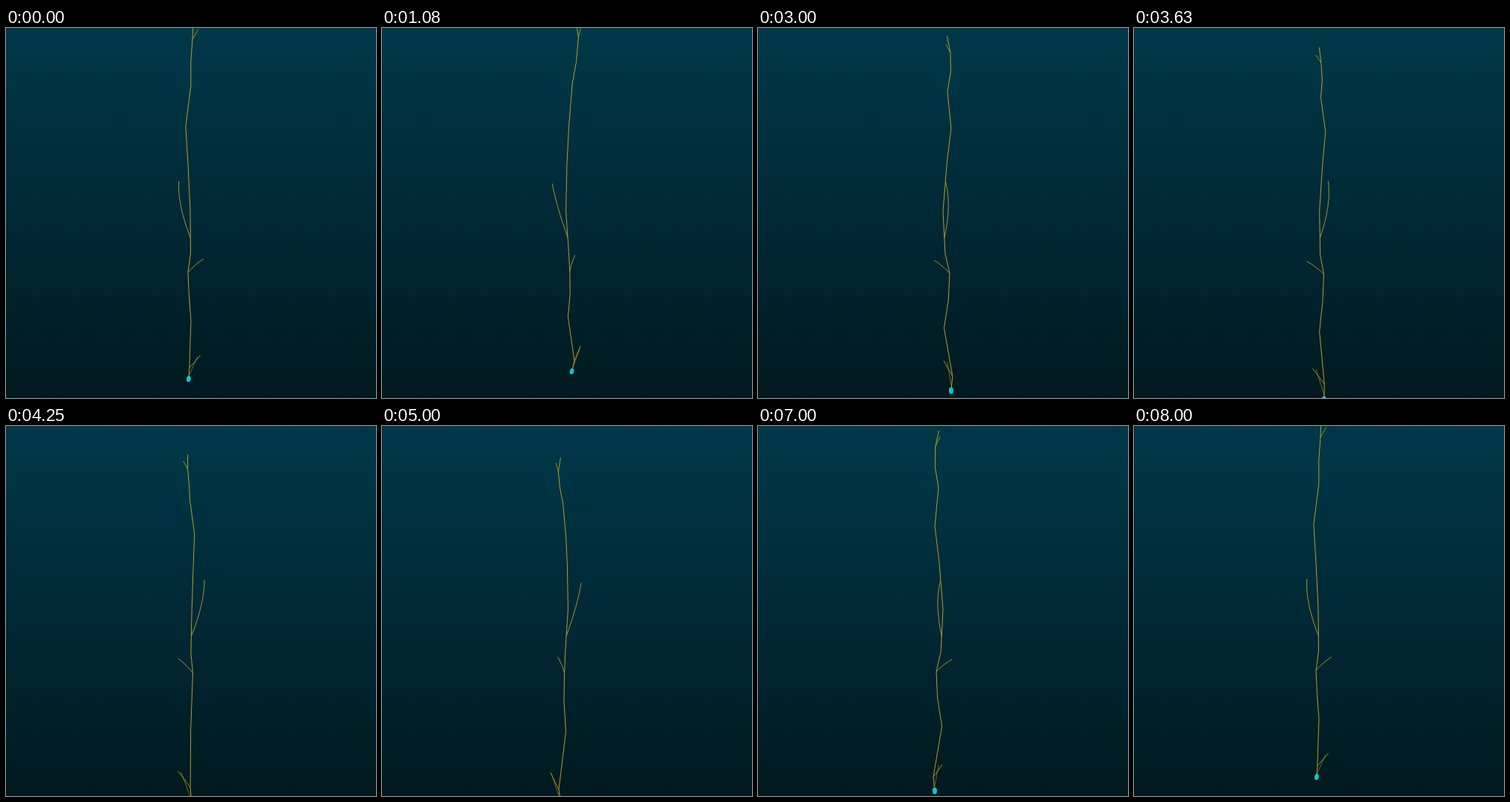
Animation of 500 by 500 pixels, one loop 8.04 s. Source, as an HTML page with a canvas:

```html
<!DOCTYPE html>
<html lang="en">
<head>
<meta charset="utf-8">
<title>Rotating neuron</title>
<style>
html, body { margin: 0; width: 100%; height: 100%; overflow: hidden; background: #002936; }
canvas { display: block; width: 500px; height: 500px; }
</style>
</head>
<body>
<canvas id="stage" width="500" height="500"></canvas>
<script>
const ctx = document.getElementById('stage').getContext('2d');
const SIZE = 500, MID = SIZE / 2;
const LOOP = 8040, STEPS = 192, FPS = 24;
const DIST = 520;           // camera distance
const TILT = 0.25;          // sine of the angle between cell and orbit axis
const TILT_COS = Math.sqrt(1 - TILT * TILT);
const PHASE = Math.PI / 4;  // angle at which the camera is highest
const DEPTH = 0.5;          // thickness of the cell relative to its width

// Bends of the trunk from the soma upward: [x, z, height].
const bends = [
  [-3.2, 12.4, -241], [-2.1, 16.3, -222], [0, 2, -155], [-2.5, 8, -117],
  [-4, 8.7, -81], [-0.5, 3.7, -55], [-1, -1, 3], [-4, 3.4, 68],
  [-6.7, 8.9, 115], [0, 8.5, 166], [0, 15, 193], [2, 16.4, 220], [3, 10.8, 242]
];
const SOMA = bends[0];

const mix = (p, q, t) => p.map((v, i) => v + (q[i] - v) * t);

// Point on the trunk at a given height.
function trunkAt(h) {
  const i = bends.findIndex(p => p[2] > h);
  const lo = bends[i - 1], hi = bends[i];
  return mix(lo, hi, (h - lo[2]) / (hi[2] - lo[2]));
}

// Quadratic curve from the trunk to a tip; straight without a control point.
function sprout(h, tip, bend) {
  const base = trunkAt(h);
  const control = bend || mix(base, tip, 0.5);
  const points = [];
  for (let t = 0; t <= 1; t += 0.125) {
    points.push(mix(mix(base, control, t), mix(control, tip, t), t));
  }
  return points;
}

const branches = [
  sprout(220, [9, 14.5, 232]),
  sprout(-33.5, [-16.5, -11.5, 42], [-18.5, -2, 12]),
  sprout(-81, [17.2, 0, -64], [5.4, 4, -71]),
  sprout(-222, [13.5, 14.9, -203])
];
const sideShoot = sprout(-236, [9.5, 17.5, -204]);

function makeView(angle) {
  const u = angle - PHASE;
  const az = Math.atan2(Math.sin(u), TILT_COS * Math.cos(u)) + PHASE;
  const sinE = TILT * Math.cos(u), cosE = Math.sqrt(1 - sinE * sinE);
  const c = Math.cos(az), s = Math.sin(az);
  return ([x, z, h]) => {
    const side = x * c + z * s;
    const near = z * c - x * s;
    const k = DIST / (DIST - DEPTH * near * cosE - h * sinE);
    return [MID + side * k, MID + 0.5 - (h * cosE - near * sinE) * k, k];
  };
}

function drawBackground() {
  const g = ctx.createLinearGradient(0, 0, 0, SIZE);
  g.addColorStop(0, 'rgb(0,56,73)');
  g.addColorStop(0.5, 'rgb(0,41,54)');
  g.addColorStop(1, 'rgb(0,25,31)');
  ctx.fillStyle = g;
  ctx.fillRect(0, 0, SIZE, SIZE);
}

function drawPath(points, view, color) {
  ctx.beginPath();
  for (const p of points) {
    const [x, y] = view(p);
    ctx.lineTo(x, y);
  }
  ctx.strokeStyle = color;
  ctx.stroke();
}

function drawSoma(view, angle) {
  const [x, y, k] = view(SOMA);
  const lean = 0.25 * Math.cos(angle - PHASE);
  ctx.beginPath();
  ctx.ellipse(x, y, 3 * k, 4.5 * k, lean, 0, 2 * Math.PI);
  ctx.fillStyle = 'rgb(14,201,205)';
  ctx.fill();
}

function draw(time) {
  const step = Math.min(STEPS, Math.floor((time % LOOP + 4) * FPS / 1000));
  const angle = 2 * Math.PI * step / STEPS;
  const view = makeView(angle);
  drawBackground();
  ctx.lineWidth = 1;
  ctx.lineJoin = 'round';
  drawPath(sideShoot, view, 'rgb(112,106,38)');
  for (const b of branches) drawPath(b, view, 'rgb(166,147,38)');
  drawPath(bends, view, 'rgb(180,158,42)');
  drawSoma(view, angle);
}

const start = performance.now();
function tick() {
  draw(performance.now() - start);
  requestAnimationFrame(tick);
}
tick();
</script>
</body>
</html>
```
